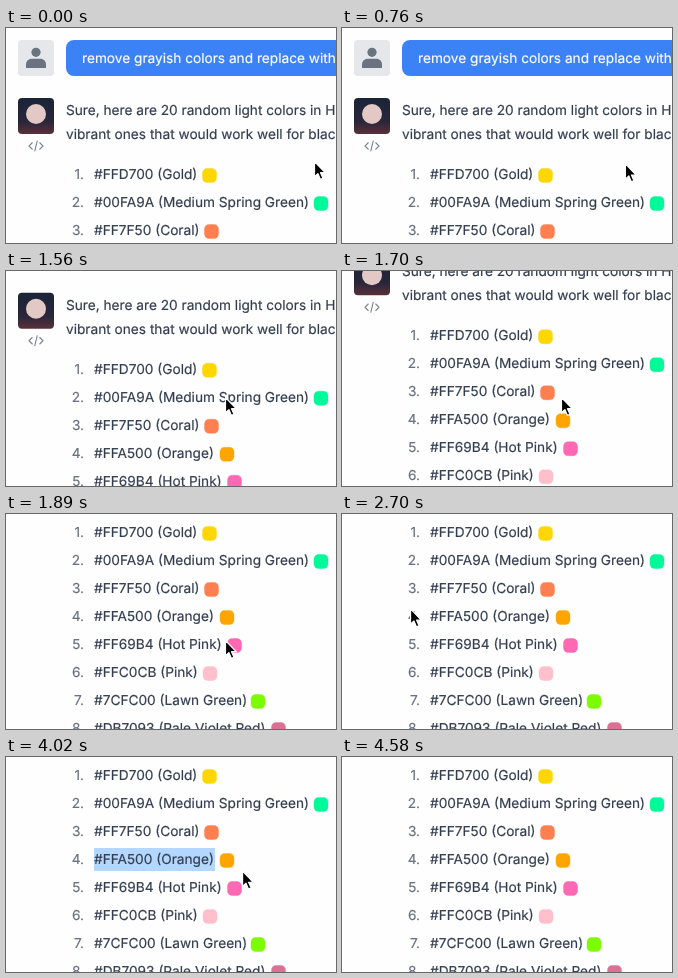
Animation of 330x215 px, one loop 5060 ms. Source, as an HTML page:

```html
<!DOCTYPE html>
<html lang="en">
<head>
<meta charset="utf-8">
<style>
  html, body { margin: 0; width: 100%; height: 100%; overflow: hidden; background: #fefefe; }
  svg { display: block; width: 330px; height: 215px; }
  text {
    font: 13.68px Inter, "Open Sans", sans-serif; text-rendering: geometricPrecision;
    fill: #323d4e; stroke: #323d4e; stroke-width: .18px; white-space: pre;
  }
  .num { fill: #677080; stroke: #677080; text-anchor: end; }
  .light { fill: #fff; stroke: #fff; }
</style>
</head>
<body>
<svg viewBox="0 0 330 215">
  <defs>
    <linearGradient id="night" x2="0" y2="1">
      <stop stop-color="#1b2438"/><stop offset=".65" stop-color="#28263a"/><stop offset="1" stop-color="#5a3038"/>
    </linearGradient>
    <clipPath id="userBox"><rect x="12" y="12" width="36" height="36" rx="4"/></clipPath>
  </defs>
  <g id="page">
    <rect x="12" y="12" width="36" height="36" rx="4" fill="#e5e7eb"/>
    <g fill="#6b7280" clip-path="url(#userBox)">
      <circle cx="30" cy="24.3" r="4.6"/>
      <path d="M20 40v-3.5c0-3.5 2.5-5.8 6-5.8h8c3.5 0 6 2.3 6 5.8V40z"/>
    </g>
    <rect x="60" y="12" width="300" height="36" rx="8" fill="#3b82f6"/>
    <text class="light" x="76" y="35">remove grayish colors and replace with vibrant</text>
    <rect x="12" y="70" width="36" height="36" rx="4" fill="url(#night)"/>
    <circle cx="30" cy="86" r="10" fill="#e3c9c6"/>
    <path d="M26.5 114.5L23 118l3.5 3.5M33.5 114.5L37 118l-3.5 3.5M31.3 112.7l-2.6 10.6" fill="none" stroke="#7b8290" stroke-width="1.1"/>
    <text x="60" y="87">Sure, here are 20 random light colors in HEX format</text>
    <text x="60" y="111">vibrant ones that would work well for black text</text>
    <rect id="mark" x="88" y="219" height="23" fill="#b3d7fe"/>
    <g id="list"></g>
  </g>
  <g id="pointer">
    <path id="arrow" d="M0-.5V14.8L3.4 11.6L5.9 17.4L8.5 16.3L6 10.7H10.7Z" fill="#000" stroke="#fff" stroke-width="1.2" stroke-linejoin="round"/>
    <path id="beam" d="M-3-8.5Q0-8.5 0-6.5Q0-8.5 3-8.5M0-6.5V6.5M-3 8.5Q0 8.5 0 6.5Q0 8.5 3 8.5" fill="none" stroke="#111" stroke-width="1.2"/>
  </g>
</svg>
<script>
const LOOP = 5060;
const $ = id => document.getElementById(id);

// code, name, swatch x
const colors = [
  ['#FFD700', 'Gold', 196.5],
  ['#00FA9A', 'Medium Spring Green', 308],
  ['#FF7F50', 'Coral', 198.5],
  ['#FFA500', 'Orange', 214],
  ['#FF69B4', 'Hot Pink', 221.5],
  ['#FFC0CB', 'Pink', 197],
  ['#7CFC00', 'Lawn Green', 245],
  ['#DB7093', 'Pale Violet Red', 265.5]
];
$('list').innerHTML = colors.map(([code, name, x], i) => {
  const y = 151 + 28 * i;
  return `<text class="num" x="78" y="${y}">${i + 1}.</text>
    <text x="88" y="${y}">${code} (${name})</text>
    <rect x="${x}" y="${y - 10.5}" width="14" height="14" rx="4.5" fill="${code}" stroke="${code}" stroke-opacity=".4"/>`;
}).join('');

const scrollKeys = [[1380, 0], [1400, 1], [1560, 48], [1700, 81.5], [1890, 128]];
const pointerKeys = [
  [620, 308.5, 134], [720, 288, 137], [980, 219.5, 127],
  [2220, 219.5, 127], [2450, 52, 95],
  [2600, 52, 95], [3120, 220, 99],
  [3150, 220, 99], [3290, 251.5, 103],
  [3800, 251.5, 103], [4050, 236, 115], [4300, 221, 103],
  [4330, 221, 103], [4580, 317, 216]
];

const linear = p => p;
const smooth = p => p * p * (3 - 2 * p);

function at(keys, t, ease) {
  const i = keys.findIndex(k => k[0] > t);
  if (i === 0) return keys[0].slice(1);
  if (i < 0) return keys[keys.length - 1].slice(1);
  const a = keys[i - 1], b = keys[i];
  const p = ease((t - a[0]) / (b[0] - a[0]));
  return a.slice(1).map((v, j) => v + (b[j + 1] - v) * p);
}

const show = (id, on) => $(id).setAttribute('visibility', on ? 'visible' : 'hidden');

function draw(t) {
  const [scroll] = at(scrollKeys, t, linear);
  const [x, y] = at(pointerKeys, t, smooth);
  $('page').setAttribute('transform', `translate(0 ${-scroll})`);
  $('pointer').setAttribute('transform', `translate(${x} ${y})`);

  const dragging = t >= 2600 && t < 3120;
  const overText = dragging && x > 88 && x < 209;
  show('arrow', t < 4580 && !overText);
  show('beam', overText);

  // the selection grows letter by letter
  const letter = 121 / 16;
  const letters = Math.max(0, Math.min(16, Math.round((x - 88) / letter)));
  const selected = t < 2600 || t >= 4080 ? 0 : dragging ? letters : 16;
  $('mark').setAttribute('width', selected * letter);
}

function tick() {
  draw(performance.now() % LOOP);
  requestAnimationFrame(tick);
}
tick();
</script>
</body>
</html>
```
